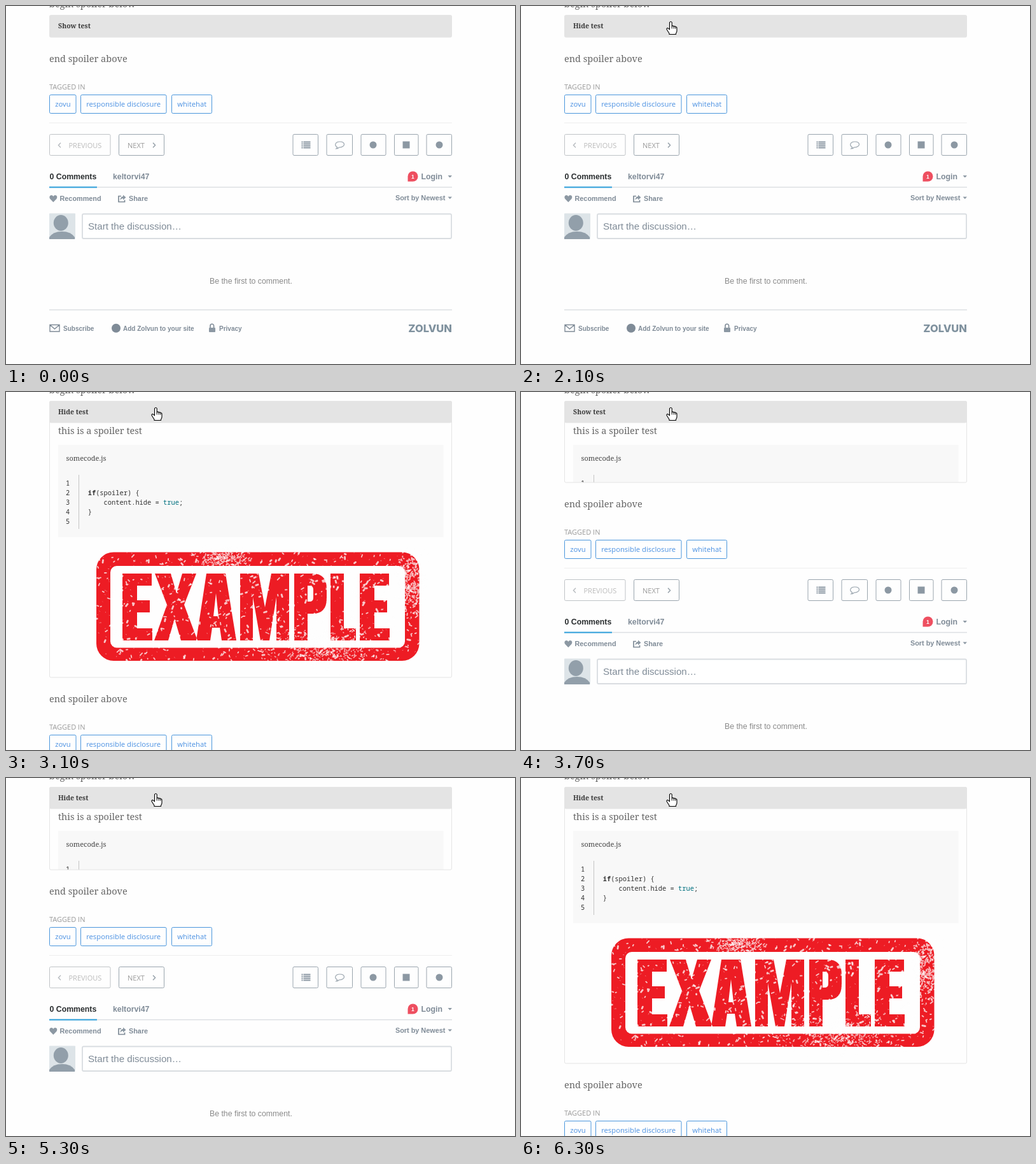
Animation of 800x562 px, one loop 7.1 s. Source, as an HTML page:

```html
<!DOCTYPE html>
<html lang="en">
<head>
<meta charset="utf-8">
<title>Spoiler box</title>
<style>
  html, body { margin: 0; width: 100%; height: 100%; overflow: hidden; background: #fefefe; }
  svg { display: block; width: 100%; height: 100%; }
  text { white-space: pre; }
  .serif { font: 14.5px "Noto Serif", serif; fill: #666; }
  .bar { font: bold 10.5px "Noto Serif", serif; fill: #3a3a3a; }
  .file { font: 11px "Noto Serif", serif; fill: #444; }
  .open { font: 11px "Open Sans", sans-serif; fill: #9a9a9a; }
  .tags text { font: 11.25px "Open Sans", sans-serif; fill: #4a90e2; }
  .tags rect { fill: none; stroke: #4a96dc; }
  .code { font: 10.38px "Noto Sans Mono", monospace; fill: #333; }
  .arial { font-family: "Liberation Sans", Arial, sans-serif; fill: #7f8b97; }
  .bold { font-weight: bold; }
  .s10 { font-size: 10px; }
  .s11 { font-size: 10.85px; }
  .s12 { font-size: 12.3px; }
  .s15 { font-size: 15.1px; }
  .mark { font: 800 16.5px Inter, sans-serif; fill: #7f919e; }
  .line { fill: none; stroke: #9aa5ae; }
  .icon { fill: #8c98a3; }
</style>
</head>
<body>
<svg viewBox="0 0 800 562" preserveAspectRatio="none">
  <defs>
    <clipPath id="clip"><rect id="clipBox" x="68" y="14" width="633" height="35"/></clipPath>
  </defs>
  <rect width="800" height="562" fill="#fefefe"/>
  <text class="serif" x="68" y="2">begin spoiler below</text>

  <g id="content" clip-path="url(#clip)">
    <text class="serif" x="82" y="66">this is a spoiler test</text>
    <rect x="82" y="83" width="605.5" height="145" fill="#f8f8f8"/>
    <text class="file" x="94.5" y="108">somecode.js</text>
    <path d="M114.5 130V215" stroke="#c4c4c4"/>
    <g id="code" class="code"></g>
    <g id="stamp"></g>
  </g>
  <rect id="frame" x="68.5" y="14.5" width="632" height="35" rx="2" fill="none" stroke="#e4e4e4"/>
  <rect id="bar" x="68" y="14" width="633" height="35.5" rx="3" fill="#e4e4e4"/>
  <text id="label" class="bar" x="82" y="35.3">Show test</text>

  <g id="below">
    <text class="serif" x="68" y="87.7">end spoiler above</text>
    <text class="open" x="68" y="130.7">TAGGED IN</text>
    <g id="tags" class="tags"></g>
    <path d="M68 183.5H701" stroke="#eee"/>

    <g id="buttons" class="line"></g>
    <path d="M86 214.7l-3.6 3.8 3.6 3.8" fill="none" stroke="#b4b9bd" stroke-width="1.3"/>
    <path d="M231 214.7l3.6 3.8-3.6 3.8" fill="none" stroke="#8f9aa3" stroke-width="1.3"/>
    <text class="open" x="98.5" y="222.7" style="fill:#bbb">PREVIOUS</text>
    <text class="open" x="191" y="222.7">NEXT</text>
    <path d="M464.5 213.5h2m1 0h11M464.5 216.5h2m1 0h11M464.5 219.5h2m1 0h11M464.5 222.5h2m1 0h11" stroke="#8c98a3" stroke-width="2"/>
    <path d="M520.5 221.5C515 218 518.5 213 524.5 213S531.5 215.5 531.5 217.5 528.5 222 523.5 222Q521.5 224 519 224 520.5 223 520.5 221.5Z" class="line" stroke-width="1.2"/>
    <circle class="icon" cx="577" cy="218" r="5.5"/>
    <rect class="icon" x="623.5" y="212.5" width="11" height="11"/>
    <circle class="icon" cx="681" cy="218" r="5.5"/>

    <text class="arial bold s12" x="68.5" y="272" style="fill:#2a2e30">0 Comments</text>
    <text class="arial bold s12" x="168" y="272">keltorvi47</text>
    <path d="M631.5 275.5V267.5a8 8 0 1 1 8 8Z" fill="#ee4f60"/>
    <text class="arial bold" x="639.3" y="270.5" font-size="8.5" text-anchor="middle" style="fill:#fff">1</text>
    <text class="arial bold s12" x="652.5" y="272">Login</text>
    <path class="icon" d="M694.5 266h6.5l-3.25 3.5zM694.5 299.5h6.5l-3.25 3.5z"/>
    <path d="M68 284.5H701" stroke="#dcdfe2" stroke-width="1.4"/>
    <path d="M68 284.5H143" stroke="#2e9fdc" stroke-width="2"/>

    <path class="icon" d="M74.3 308L69.5 303C67 300 69 297 71.5 297Q73.5 297 74.3 299 75.1 297 77.2 297C80 297 81.5 300 79.2 303Z"/>
    <text class="arial bold s11" x="84.5" y="306">Recommend</text>
    <path d="M181 298.5H177V307.5H186.5V304.5" fill="none" stroke="#7f8b97" stroke-width="1.7"/>
    <path class="icon" d="M184 296.5L188.5 300.5 184 304.5V302Q181 302 179.5 305 179.5 299.5 184 299Z"/>
    <text class="arial bold s11" x="193" y="306">Share</text>
    <text class="arial bold s11" x="612" y="304.7">Sort by Newest</text>

    <rect x="68" y="325.5" width="41" height="40.5" rx="1" fill="#dde4e8"/>
    <ellipse cx="86.3" cy="340.5" rx="11.5" ry="12.5" fill="#929faa"/>
    <path d="M68 363Q74 354 88 354T108 363V366H68Z" fill="#929faa"/>
    <rect x="120" y="326.5" width="580" height="38.5" rx="2" fill="#fff" stroke="#d9dde1" stroke-width="1.8"/>
    <text class="arial s15" x="129" y="351">Start the discussion…</text>
    <text class="arial s12" x="320" y="436" style="fill:#8a8a8a">Be the first to comment.</text>
    <path d="M68 477H701" stroke="#dcdfe2" stroke-width="1.4"/>

    <path d="M69 500.5H84V511H69ZL76.5 507 84 500.5" fill="none" stroke="#7f8b97" stroke-width="1.4"/>
    <text class="arial bold s10" x="90" y="509.8">Subscribe</text>
    <circle cx="173" cy="505.7" r="7" fill="#7f8b97"/>
    <text class="arial bold s10" x="184" y="509.8">Add Zolvun to your site</text>
    <rect class="icon" x="319" y="505" width="10" height="7" rx="1"/>
    <path d="M321 505V502a2.8 2.8 0 0 1 5.6 0V505" fill="none" stroke="#7f8b97" stroke-width="1.6"/>
    <text class="arial bold s10" x="335" y="509.8">Privacy</text>
    <text class="mark" x="701" y="512" text-anchor="end">ZOLVUN</text>
  </g>

  <g id="cursor" fill="#fff" stroke="#000" stroke-linejoin="round">
    <path id="arrow" d="M.5 .5V14.5L3.6 11.7 6 17 8.3 16 6 10.8H10Z"/>
    <g id="hand" stroke-width="1.1">
      <path d="M-2 1.8Q0 -.8 1.7 1.8V7.5q1.8-1 3 .6 2-.8 3 .7 1.8-.2 1.8 2V15q0 2-1.5 4V20.500H-2.500V19L-6 13.500q-1.200-2 .2-2.800 1.600-.6 3.800 2.300Z"/>
      <path d="M1.7 7.5v4M4.7 8.1v3.5M7.4 8.8v3" fill="none" stroke-width="1"/>
    </g>
  </g>
</svg>
<script>
const $ = id => document.getElementById(id);
const LOOP = 7100, STEP = 100, FULL = 399, SLIDE = 400;

// Tags and buttons: x, width, label or colour
$('tags').innerHTML = [[68, 42, 'zovu'], [117, 135, 'responsible disclosure'], [260, 63.5, 'whitehat']]
  .map(([x, w, s]) => `<rect x="${x + .5}" y="139.5" width="${w - .5}" height="29" rx="2"/>
    <text x="${x + 9.2}" y="158">${s}</text>`).join('');
$('buttons').innerHTML = [[68, 96, '#c0c4c7'], [177, 71.5], [450.5, 40], [503.5, 41], [557.5, 39.5], [610, 38], [660.5, 40]]
  .map(([x, w, c = '#9aa5ae']) => `<rect x="${x + .5}" y="201.5" width="${w - .5}" height="33" rx="2" stroke="${c}"/>`).join('');

const source = ['', '<tspan font-weight="bold">if</tspan>(spoiler) {',
  '    content.hide = <tspan fill="#00707f">true</tspan>;', '}', ''];
$('code').innerHTML = source.map((s, i) => {
  const y = 147 + 15 * i;
  return `<text x="94" y="${y}">${i + 1}</text><text x="128.7" y="${y}">${s}</text>`;
}).join('');

// Rubber stamp with worn paint
let seed = 17;
const rnd = () => (seed = seed * 16807 % 2147483647) / 2147483647;
const spread = r => (rnd() + rnd() + rnd() - 1.5) * r;
const fleck = (x, y, size) =>
  `M${x.toFixed(1)} ${y.toFixed(1)}l${((rnd() - .35) * size).toFixed(1)} ${((rnd() - .6) * size).toFixed(1)}`;
const flecks = (n, size, place) => Array.from({ length: n }, () => fleck(...place(), size)).join('');
const anywhere = () => [143 + rnd() * 506, 252 + rnd() * 169];
const near = (x, y, rx, ry) => () => [x + spread(rx), y + spread(ry)];
const wear = (n, size, place, w, o) => `<path d="${flecks(n, size, place)}" stroke-width="${w}" opacity="${o}"/>`;

const letterE = x => `M${x} 285h46v19h-23v23h20v19h-20v25h24v19h-47z`;
const letters = letterE(183) +
  'M234 285h25l9 31 9-31h22l-19 49 21 56h-26l-10-34-10 34h-22l20-56z' +
  'M315 285h30l17 105h-23l-3-20h-12l-3 20h-22zM326 352h8l-4-36z' +
  'M368 285h29l10 53 10-53h28v105h-20v-68l-11 68h-14l-12-68v68h-20z' +
  'M453 285h29q22 0 22 24v15q0 24-22 24h-8v42h-21zM474 304v25h3q6 0 6-6v-13q0-6-6-6z' +
  'M510 285h21v86h19v19h-40z' + letterE(556);
$('stamp').innerHTML = `
  <rect x="142" y="251.5" width="507.5" height="170.5" rx="27" fill="#ed1c24"/>
  <rect x="164" y="273" width="463" height="128.5" rx="10" fill="#fefefe"/>
  <path d="${letters}" fill="#ed1c24" fill-rule="evenodd"/>
  <g fill="none" stroke="#fefefe" stroke-linecap="round">` +
  wear(420, 6, anywhere, 1.8, .75) +
  wear(200, 7, anywhere, 2.8, .75) +
  wear(400, 2, anywhere, .8, .6) +
  wear(260, 4, near(342, 261, 44, 16), 1.6, .7) +
  wear(260, 4, near(638, 300, 20, 46), 1.8, .7) +
  wear(520, 4, near(500, 402, 90, 32), 1.5, .65) + '</g>';

const clamp = p => Math.max(0, Math.min(1, p));
const swing = p => .5 - Math.cos(Math.PI * clamp(p)) / 2;
const mix = (a, b, p) => a + (b - a) * p;

function opening(t) {
  if (t >= 5200) return swing((t - 5170) / SLIDE);
  if (t >= 3700) return 1 - swing((t - 3428) / SLIDE);
  return swing((t - 2145) / SLIDE);
}

function pointer(t) {
  const enter = swing((t - 350) / 750), move = swing((t - 1250) / 750);
  return t <= 1300
    ? [mix(800, 396.5, enter), mix(562, 97.5, enter)]
    : [mix(396.5, 235.5, move), mix(97.5, 24, move)];
}

function draw(t) {
  const off = Math.round(FULL * opening(t)), open = off > 0;
  $('below').setAttribute('transform', `translate(0 ${off})`);
  $('clipBox').setAttribute('height', 35 + off);
  $('frame').setAttribute('height', 34.5 + off);
  $('bar').setAttribute('height', open ? 34.5 : 35.5);
  for (const id of ['content', 'frame']) $(id).style.display = open ? '' : 'none';
  $('label').textContent = t >= 5200 || (t >= 2100 && t < 3700) ? 'Hide test' : 'Show test';

  const [x, y] = pointer(t), over = y < 49;
  $('cursor').style.display = t < 400 ? 'none' : '';
  $('cursor').setAttribute('transform', `translate(${x.toFixed(1)} ${y.toFixed(1)})`);
  $('arrow').style.display = over ? 'none' : '';
  $('hand').style.display = over ? '' : 'none';
}

const start = performance.now();
function tick() {
  const t = (performance.now() - start) % LOOP;
  draw(Math.floor(t / STEP) * STEP);
  requestAnimationFrame(tick);
}
tick();
</script>
</body>
</html>
```
